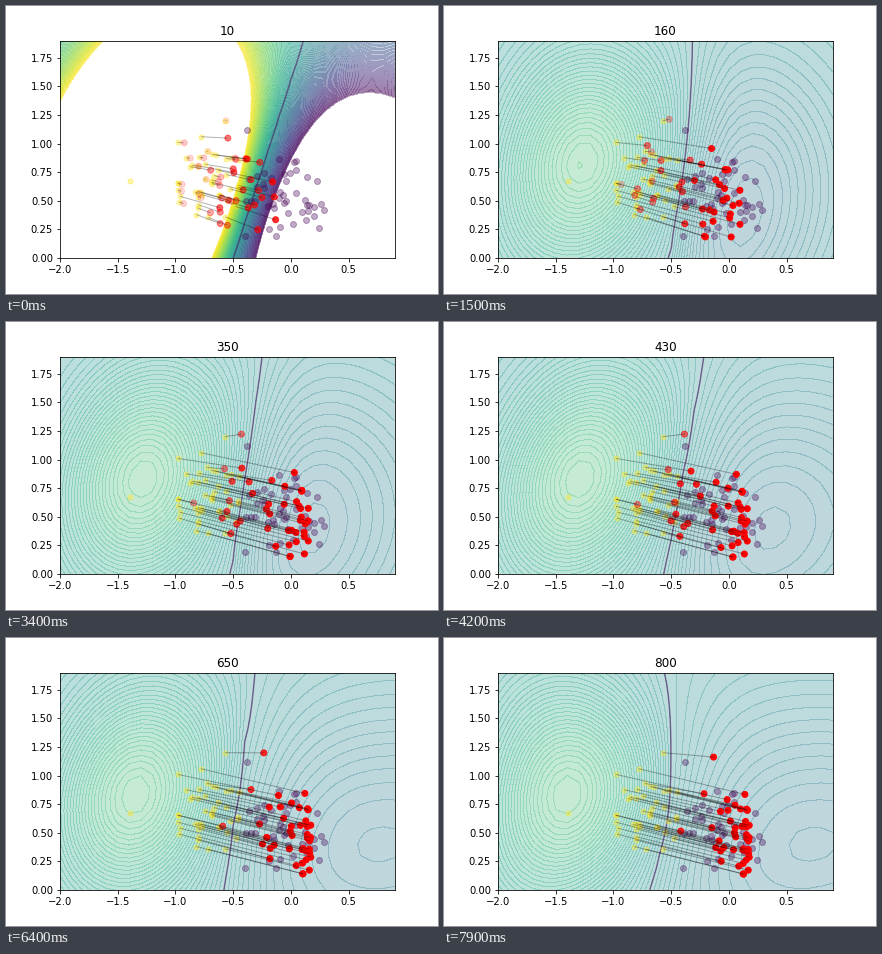
A matplotlib script for the animation above (8 s loop, 432 by 288 pixels).

```python
import numpy as np
import matplotlib.pyplot as plt
from matplotlib.animation import FuncAnimation
from matplotlib.collections import LineCollection

plt.rcParams.update({"font.family": "DejaVu Sans", "font.size": 10})

FRAMES, INTERVAL = 80, 100
PURPLE, YELLOW = "#440154", "#fde725"
X, Y = np.meshgrid(np.arange(30) / 10 - 2, np.arange(20) / 10)
LEVELS = np.linspace(-1, 1, 161)
rng = np.random.default_rng(7)


def cloud(n, center, radii, outliers):
    """Outlying points followed by n random ones inside an ellipse."""
    r, a = rng.random(n) ** .55, rng.uniform(0, 2 * np.pi, n)
    disc = np.c_[r * np.cos(a), r * np.sin(a)]
    return np.vstack([outliers, center + disc * radii])


def keys(t, *pairs):
    return np.interp(t, *zip(*pairs))


start = cloud(40, (-.7, .67), (.32, .34),
              [(-1.39, .67), (-.98, 1.01), (-.78, 1.06), (-.57, 1.2), (-.82, .38)])
fixed = cloud(42, (-.06, .53), (.34, .36),
              [(-.38, 1.12), (.29, .42), (.24, .26), (-.4, .19)])

# Points near the boundary set off first; the outliers have their own delay
ready = -1.7 + 5 * (start[:, 0] + .65) + rng.normal(0, 1.3, len(start))
ready[:5] = -12, -2.9, -1.1, -4.2, -1.3
goal_x = np.clip(.19 + .03 * ready, -.02, .18)
goal = np.c_[goal_x, start[:, 1] - .25 * (goal_x - start[:, 0])]


def lobe(u, w, p, dy, h):
    """Bump that is 0 at u = 0 and 1 at u = w."""
    r = u / w
    return r * np.exp((1 - np.abs(r) ** p) / p - dy ** 2 / (2 * h ** 2))


def field(t):
    """Discriminator output: steep at first, then a soft hill and pit."""
    early = np.exp(-t / .2)
    gain = 1 + 10 * early
    mid = keys(t, (0, -.195), (.8, -.37), (5, -.39), (7.9, -.51))
    slope = keys(t, (0, .32), (.8, .12), (2.2, .09), (5, .21), (7.9, .06))
    bend = keys(t, (0, 0), (.8, -.09), (2.2, 0), (6.4, 0), (7.9, -.13))
    y = Y - .95
    u = X - (mid + slope * y + bend * y ** 2)

    tilt = .32 * early * X
    hill = .4 * lobe(-u, .88 + .13 * early, 3,
                     Y + tilt - .83 + .57 * early, .68 + .28 * early)
    pit_w = keys(t, (0, .89), (.8, .55), (3.4, .65), (6, 1.3))
    pit = .19 * (1 + .45 * np.exp(-t)) * lobe(u, pit_w, 1 + np.exp(-t / 2),
                                              Y + tilt - .4 + .14 * early, .96)
    return gain * np.where(u < 0, hill, -pit)


def moved(t):
    """Logistic travel from start to goal along a slight arc."""
    push = keys(t, (0, 0), (.8, 1.4), (3.4, 2.95), (7.9, 5))
    f = 1 / (1 + np.exp(-ready - push))
    pos = start + f[:, None] * (goal - start)
    pos[:, 1] += .6 * f * (1 - f) * (start[:, 1] - .65)
    return pos, f


fig, ax = plt.subplots(figsize=(6, 4), dpi=72, facecolor="white")
fig.subplots_adjust(left=.125, right=.9, bottom=.125, top=.88)


def draw(i):
    t = i * INTERVAL / 1000
    ax.clear()
    z = field(t)
    ax.contourf(X, Y, z, LEVELS, cmap="viridis", alpha=.3)
    ax.contour(X, Y, z, [0], colors=PURPLE, alpha=.5, linewidths=1.5)

    pos, f = moved(t)
    ax.scatter(*start.T, s=25, color=YELLOW, alpha=.4, zorder=2)
    ax.scatter(*fixed.T, s=36, color=PURPLE, alpha=.33, zorder=2)
    opacity = np.where(f < .01, 0, np.minimum(1, 1.2 * f ** .6))
    ax.scatter(*pos.T, s=36, c=[(1, 0, 0, a) for a in opacity], zorder=3)
    ax.add_collection(LineCollection(np.stack([start, pos], axis=1),
                                     colors="black", alpha=.3, linewidths=1, zorder=4))

    ax.set(xlim=(-2, .9), ylim=(0, 1.9), title=str(10 * (i + 1)),
           xticks=np.arange(-2, .6, .5), yticks=np.arange(0, 1.8, .25))


anim = FuncAnimation(fig, draw, frames=FRAMES, init_func=lambda: None,
                     interval=INTERVAL, repeat=True, repeat_delay=0)
plt.show()
```
